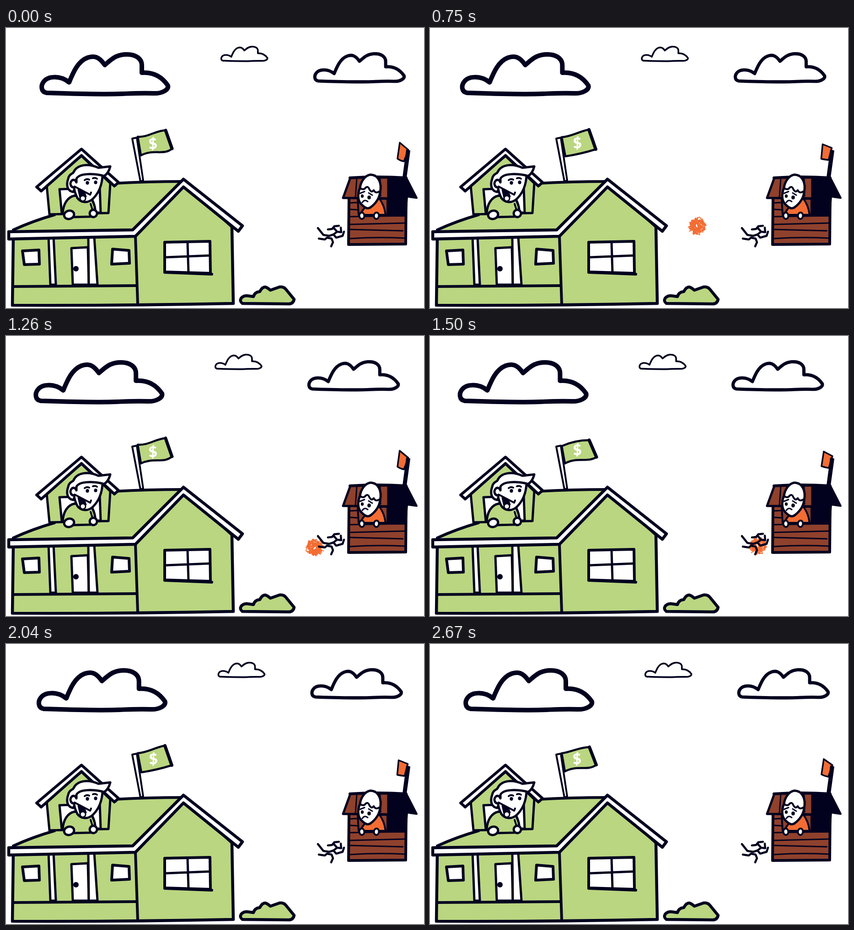
An HTML page with a canvas for the animation above (2700 ms loop, 914 px wide and 613 px high).

```html
<!DOCTYPE html>
<html lang="en">
<head>
<meta charset="utf-8">
<title>Two houses</title>
<style>
html, body { margin: 0; width: 100%; height: 100%; overflow: hidden; background: #fff; }
canvas { display: block; }
</style>
</head>
<body>
<canvas id="stage" width="914" height="613"></canvas>
<script>
const ctx = document.getElementById('stage').getContext('2d');
const LOOP = 2700, STEP = 30, WAVE = 1290;
const INK = '#02021f', GREEN = '#bad680', BROWN = '#8f412c', ORANGE = '#f26d33', WHITE = '#fff';

function shape(path, fill, width = 0, stroke = INK) {
  const p = new Path2D(path);
  if (fill) { ctx.fillStyle = fill; ctx.fill(p); }
  if (width) { ctx.lineWidth = width; ctx.strokeStyle = stroke; ctx.stroke(p); }
}

const line = (path, width) => shape(path, null, width);

function oval(x, y, rx, ry, fill, width = 0, turn = 0) {
  ctx.beginPath();
  ctx.ellipse(x, y, rx, ry, turn, 0, 2 * Math.PI);
  ctx.fillStyle = fill;
  ctx.fill();
  if (width) { ctx.lineWidth = width; ctx.strokeStyle = INK; ctx.stroke(); }
}

// Clouds share one outline, measured from its top left corner.
const CLOUD = 'M14 89 C1 87 1 73 7 65 C16 52 43 50 63 66 C72 44 82 20 103 12 C117 7 128 9 141 28 ' +
  'C154 17 163 7 183 5 C207 3 222 13 222 29 L222 45 C248 43 266 54 279 73 C281 82 267 91 247 90 ' +
  'C222 89 205 90 180 91 C130 93 75 91 14 89 Z';

function cloud(x, y, scale) {
  ctx.save();
  ctx.translate(x, y);
  ctx.scale(scale, scale);
  shape(CLOUD, WHITE, 10);
  ctx.restore();
}

function clouds(t) {
  const drift = -6.5 * (1 - Math.cos(2 * Math.PI * t / LOOP));
  cloud(75 + drift, 53, 1);
  cloud(673 + drift, 53, 0.708);
  cloud(469.5 + drift, 39, 0.366);
}

// Repeatable noise from 0 to 1.
function noise(n) {
  const v = Math.sin(n * 127.1) * 43758.5;
  return v - Math.floor(v);
}

function ball(t) {
  const x = 537 + 0.177 * (t - 480);
  if (x > 800) return; // behind the shack for good
  const y = 449 + 15 * Math.cos(2 * Math.PI * (t - 1345) / 1190);
  ctx.save();
  ctx.translate(x, y);
  ctx.rotate(x / 22);
  ctx.beginPath();
  let angle = 0;
  for (let i = 0; i < 42; i++) {
    const bend = angle + 0.9, reach = 20 * noise(i + 50);
    angle += 1.6 + 1.6 * noise(i);
    const r = 15 + 6 * noise(i + 100);
    ctx.quadraticCurveTo(reach * Math.cos(bend), reach * Math.sin(bend), r * Math.cos(angle), r * Math.sin(angle));
  }
  ctx.lineWidth = 1.8;
  ctx.strokeStyle = ORANGE;
  ctx.stroke();
  ctx.restore();
}

// Each pose: phase in ms, then the points of the cloth.
const BIG_FLAG = [
  [0, [288,238, 310,240, 328,224, 349,224, 363,264, 345,280, 322,264, 295,279, 321,254]],
  [210, [288,241, 308,232, 326,228, 348,228, 364,265, 345,278, 322,264, 295,279, 322,250]],
  [495, [288,241, 308,234, 326,220, 348,224, 363,269, 345,262, 322,278, 297,283, 321,249]],
  [1005, [288,237, 310,242, 332,230, 347,221, 362,262, 345,280, 322,276, 295,279, 323,256]]
];
const SMALL_FLAG = [
  [0, [861,251, 880,267, 870,292, 856,286]],
  [210, [861,253, 880,263, 872,289, 856,285]],
  [495, [858,257, 878,260, 873,286, 855,286]],
  [1005, [859,252, 879,265, 870,292, 856,287]]
];

function pose(poses, t) {
  const phase = t % WAVE;
  let i = poses.length - 1;
  while (poses[i][0] > phase) i--;
  const [start, from] = poses[i];
  const [next, to] = poses[(i + 1) % poses.length];
  const k = (phase - start) / ((next || WAVE) - start);
  return from.map((v, n) => v + (to[n] - v) * k);
}

function bigFlag(t) {
  const p = pose(BIG_FLAG, t);
  shape(`M${p.slice(0, 2)} C${p.slice(2, 8)} L${p.slice(8, 10)} C${p.slice(10, 16)} Z`, GREEN, 4.5);
  line(`M${p.slice(6, 8)} L${p.slice(8, 10)}`, 7);
  ctx.save();
  ctx.translate(p[16], p[17]);
  ctx.rotate(-0.06);
  ctx.font = '900 32px Lato, sans-serif';
  ctx.textAlign = 'center';
  ctx.textBaseline = 'middle';
  ctx.fillStyle = WHITE;
  ctx.fillText('$', 0, 1);
  ctx.restore();
  shape('M276 242 L286 240 L300 334 L294 336 Z', WHITE, 4);
}

function smallFlag(t) {
  const p = pose(SMALL_FLAG, t);
  shape(`M${p.slice(0, 2)} L${p.slice(2, 4)} L${p.slice(4, 6)} Q${(p[4] + p[6]) / 2},${p[5] - 1} ${p.slice(6)} Z`, ORANGE, 3.5);
  shape('M876 267 L883 269 L875 327 L868 327 Z', INK, 2);
}

function bigHouse() {
  shape('M16 455 L14 607 Q260 608 497 603 L494 435 L388 338 L281 452 Z', GREEN, 6.5);
  shape('M18 442 L106 409 L240 339 L386 336 L279 444 Z', GREEN);
  line('M16 442 Q60 422 106 409 M238 340 Q310 336 386 336', 6);

  // Porch
  line('M283 456 L288 604', 6);
  shape('M143 482 L179 480 L181 562 L146 562 Z', WHITE, 5);
  oval(153, 527, 6, 6, INK);
  shape('M93 458 L104 458 L109 562 L97 562 Z M180 458 L193 458 L200 562 L181 562 Z', WHITE, 5);
  line('M15 566 L286 564', 6);
  shape('M36 488 L72 486 L73 517 L40 518 Z M233 484 L269 487 L270 515 L231 517 Z', WHITE, 6);

  // Side window
  shape('M347 469 L446 467 L447 537 L347 534 Z', WHITE, 6);
  line('M397 470 L399 536 M348 502 L446 498', 5);
  line('M347 535 L450 539', 6);

  shape('M6 446 L277 442 L388 331 L517 433 L508 445 L388 348 L283 456 L6 462 Z', WHITE, 6.5);
}

function dormer() {
  shape('M89 345 L95 408 L224 405 L228 340 L165 280 Z', GREEN, 5);
  shape('M117 353 L145 352 L205 350 L207 404 L122 406 Z', WHITE, 5);
  shape('M165 265 L67 348 L77 357 L165 279 L237 346 L246 338 Z', WHITE, 6);
}

function richMan() {
  shape('M124 406 C125 386 134 370 150 367 L184 369 C193 382 195 393 196 406 L185 413 L145 414 Z', GREEN, 5);
  line('M189 398 L185 385', 4);
  oval(138, 409, 11, 9, WHITE, 5, -0.3);
  oval(191, 406, 8, 8, WHITE, 5, 0.5);

  // Hair, then the face over it
  shape('M147 359 C134 357 131 344 136 330 C138 321 143 320 147 317 C155 298 180 296 202 306 ' +
    'L228 303 Q223 322 210 326 L158 336 Z', WHITE, 5);
  shape('M154 330 C160 318 188 318 211 323 C210 345 203 361 190 374 C178 385 163 382 156 372 ' +
    'C152 364 149 356 149 349 C141 349 139 340 143 335 C147 330 152 333 154 338 Z', WHITE, 5);
  line('M150 347 L184 365 L186 360', 4);
  shape('M158 354 L172 361 L175 369 L162 372 Z', INK, 3);
  oval(168, 373, 6, 6, WHITE, 3, 0.2);
  line('M172 333 Q177 329 182 332 M190 329 Q195 327 199 330', 4);
  oval(178, 339, 3.6, 4, INK);
  oval(196, 338, 3.6, 4, INK);
}

function shack() {
  shape('M750 370 L749 474 L874 473 L875 368 Z', BROWN, 6);
  shape('M833 327 L875 327 L898 372 L877 369 L874 411 L833 411 Z', INK, 4);
  shape('M753 328 L836 327 L836 373 L737 372 Z', BROWN, 5);
  line('M767 330 L764 371 M784 329 L782 345 M818 329 L819 368', 3);
  line('M752 328 Q810 324 875 328', 6);
  line('M752 383 L768 382 M752 397 L768 398 M752 413 L873 411 M752 430 L872 427 M752 441 L868 444 M752 461 Q810 457 872 460', 3);
  shape('M769 374 L834 374 L834 409 L771 409 Z', BROWN, 4);
}

function poorMan() {
  shape('M775 409 C780 394 792 386 814 371 C823 381 828 393 830 409 Z', ORANGE, 4);
  oval(778, 411, 5.5, 7, WHITE, 4, -0.1);
  oval(810, 411, 5.5, 7, WHITE, 4, 0.1);
  shape('M797 321 C785 323 776 335 774 350 C769 362 768 377 777 386 C784 393 791 398 798 392 ' +
    'C807 385 816 374 818 360 C822 341 816 322 797 321 Z', WHITE, 5);
  line('M775 351 Q782 356 787 349 Q792 346 794 352 Q799 362 804 355 Q808 363 816 358', 4);
  line('M774 362 L784 358 M793 361 L801 366 M779 382 Q784 374 791 380', 3);
  oval(779, 368, 3.2, 3.8, INK);
  oval(794, 371, 3.8, 4.2, INK);
}

function plants() {
  shape('M517 603 C508 597 514 587 526 586 L541 588 Q544 578 555 577 Q560 567 567 567 ' +
    'Q573 569 578 574 L598 567 Q607 566 612 572 L630 594 Q628 604 618 604 Z', GREEN, 6.5);
  line('M682 438 L694 453 L707 455 L716 452 L722 459 L736 455 L739 446 M684 461 L697 463 L702 459 L712 461 L715 469 L711 478 ' +
    'M704 441 L713 440 L718 434 L728 433 M716 452 L724 446 L717 438 M724 446 L733 447 L732 437', 4.5);
}

function draw(t) {
  ctx.fillStyle = WHITE;
  ctx.fillRect(0, 0, 914, 613);
  ctx.lineJoin = ctx.lineCap = 'round';
  clouds(t);
  ball(t);
  bigHouse();
  dormer();
  richMan();
  bigFlag(t);
  smallFlag(t);
  shack();
  poorMan();
  plants();
}

function tick(now) {
  draw(Math.floor((now % LOOP) / STEP) * STEP);
  requestAnimationFrame(tick);
}
tick(performance.now());
</script>
</body>
</html>
```
